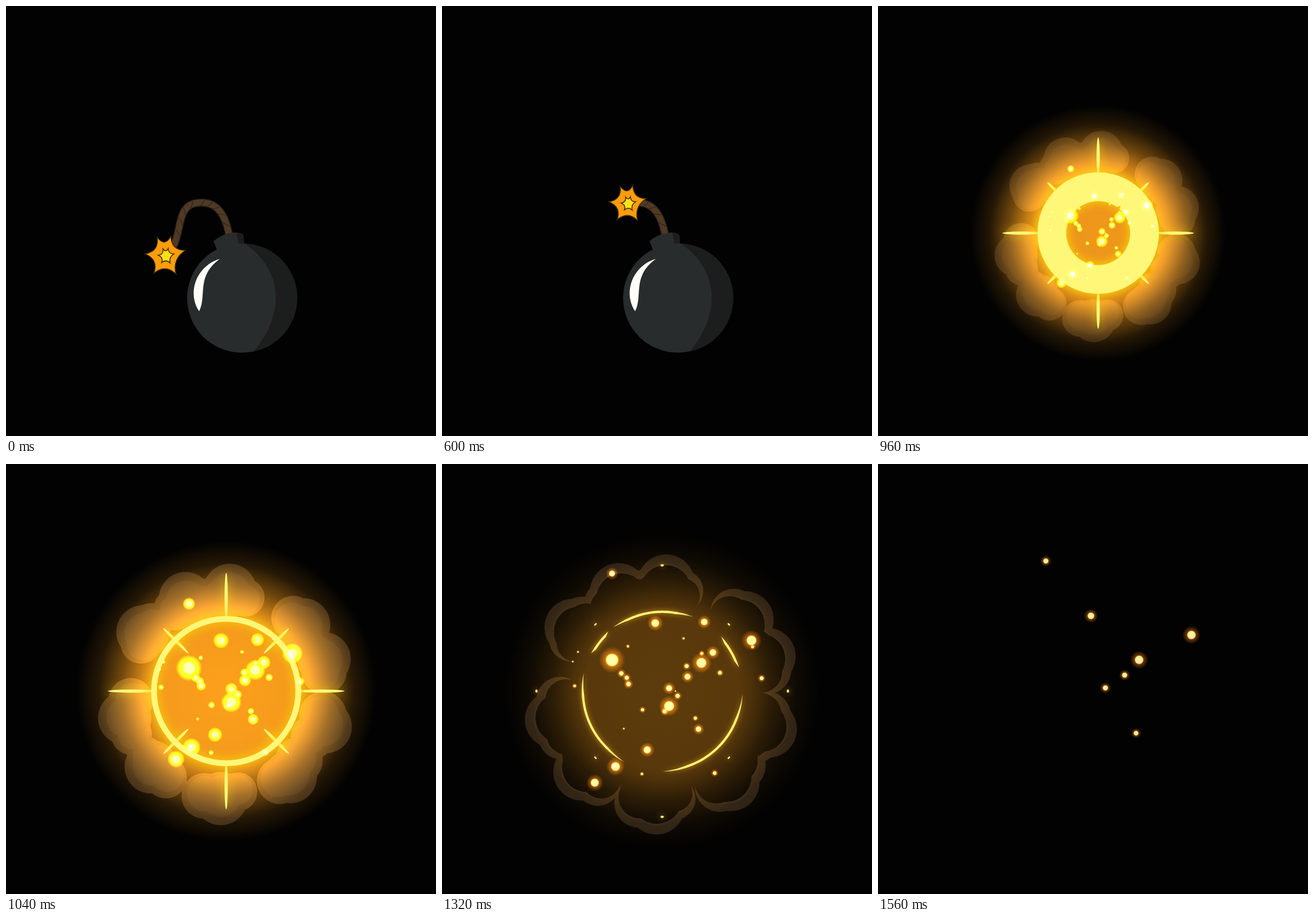
Recreate the animation shown at these times as an HTML page with a canvas. Size 748x748 px, loop 1.6 s.

```html
<!DOCTYPE html>
<html lang="en">
<head>
<meta charset="utf-8">
<title>Bomb</title>
<style>
html, body { margin: 0; width: 100%; height: 100%; overflow: hidden; background: #020202; }
canvas { display: block; }
</style>
</head>
<body>
<canvas id="stage" width="748" height="748"></canvas>
<script>
const SIZE = 748, LOOP = 1600, STEP = 40, CX = 383, CY = 395, RAD = Math.PI / 180;
const ctx = document.getElementById('stage').getContext('2d');
const smokeLayer = document.createElement('canvas');
smokeLayer.width = smokeLayer.height = SIZE;
const smokeCtx = smokeLayer.getContext('2d');

let seed = 11;
function random(min, max) {
  seed = seed * 16807 % 2147483647;
  return min + (max - min) * seed / 2147483647;
}

const polar = (degrees, r) => [r * Math.cos(degrees * RAD), r * Math.sin(degrees * RAD)];

// Every smoke lobe is one big puff with two smaller ones at its sides
const puffs = [-143, -113, -88, -42, -20, 18, 52, 93, 136, 167].flatMap(angle => [
  [...polar(angle, 180), 46],
  [...polar(angle - random(6, 10), random(165, 180)), random(32, 42)],
  [...polar(angle + random(6, 10), random(165, 180)), random(32, 42)]
]);

// The brightest embers [x, y, radius]; the first ones outlive the rest
const LASTING = 7;
const embers = [
  [538, 307, 9], [451, 346, 9], [427, 370, 5.5], [395, 390, 5.5], [371, 277, 7],
  [296, 191, 5.5], [446, 461, 5], [296, 341, 11.5], [395, 421, 9], [302, 526, 8],
  [266, 554, 7.5], [357, 497, 6.5], [471, 328, 6], [456, 275, 6]
];
for (let i = 0; i < 22; i++) {
  const [dx, dy] = polar(random(0, 360), random(20, 175));
  embers.push([CX + dx, CY + dy, random(1, 4.5)]);
}

// Centre angle and half span in degrees
const arcs = [[-97.5, 30], [-142, 10], [-30, 13], [46, 44], [155.5, 37.5]];
const sparkTips = [-114, -75, -16, 60, 124, 186].map(angle => polar(angle, 36));

// Piecewise linear value over time: key(t, time, value, time, value, ...)
function key(t, ...k) {
  if (t <= k[0]) return k[1];
  for (let i = 2; i < k.length; i += 2) {
    if (t <= k[i]) return k[i - 1] + (k[i + 1] - k[i - 1]) * (t - k[i - 2]) / (k[i] - k[i - 2]);
  }
  return k[k.length - 1];
}

// Rises from 0 at the start towards 1, slowing down
const easeOut = (t, start, tau) => 1 - Math.exp(-Math.max(0, t - start) / tau);
const burst = t => easeOut(t, 873, 62);

function disc(c, x, y, r) {
  c.beginPath();
  c.arc(x, y, r, 0, 7);
  c.fill();
}

function shape(d, fill) {
  ctx.fillStyle = fill;
  ctx.fill(new Path2D(d));
}

function stroke(color, width) {
  ctx.strokeStyle = color;
  ctx.lineWidth = width;
  ctx.stroke();
}

function radial(x, y, r, stops) {
  const g = ctx.createRadialGradient(x, y, 0, x, y, r);
  stops.forEach(([at, color]) => g.addColorStop(at, color));
  ctx.fillStyle = g;
  disc(ctx, x, y, r);
}

function cubic(u, a, b, c, d) {
  const v = 1 - u;
  return v * v * v * a + 3 * v * v * u * b + 3 * v * u * u * c + u * u * u * d;
}

// Fuse position: 0 at the bomb, 1 at the top of the bend, 2 at the free end
function fusePoint(s) {
  return s < 1
    ? [cubic(s, 388, 380, 362, 340), cubic(s, 398, 355, 342, 342)]
    : [cubic(s - 1, 340, 296, 308, 290), cubic(s - 1, 342, 342, 385, 420)];
}

function fuseSide(s, offset) {
  const [x, y] = fusePoint(s), [x2, y2] = fusePoint(s + .01);
  const len = Math.hypot(x2 - x, y2 - y);
  return [x - (y2 - y) / len * offset, y + (x2 - x) / len * offset];
}

function drawFuse(end) {
  ctx.beginPath();
  for (let s = 0; s < end; s += .02) ctx.lineTo(...fusePoint(s));
  stroke('#2b241e', 13.5);
  stroke('#513924', 10.5);
  ctx.beginPath();
  for (let s = .12; s < end - .1; s += .2) {
    ctx.moveTo(...fuseSide(s, 5));
    ctx.quadraticCurveTo(...fusePoint(s + .02), ...fuseSide(s + .1, -5));
  }
  stroke('#30231a', 1.3);
}

function drawStar(x, y, scale, fill) {
  ctx.beginPath();
  sparkTips.forEach(([px, py], i) => {
    const [qx, qy] = sparkTips[(i + 1) % 6];
    if (!i) ctx.moveTo(x + px * scale, y + py * scale);
    ctx.quadraticCurveTo(x + (px + qx) * .22 * scale, y + (py + qy) * .22 * scale,
      x + qx * scale, y + qy * scale);
  });
  ctx.closePath();
  ctx.fillStyle = fill;
  ctx.fill();
  stroke('#3b2c16', 1.5);
}

function drawBomb(t) {
  const burn = key(t, 0, 2.15, 320, 1.6, 600, 1.13, 880, .3, 960, 0);
  ctx.globalAlpha = key(t, 880, 1, 960, 0);
  drawFuse(Math.min(2, burn));
  shape('M400 394Q409 394 413 398L415 420H405Z', '#1c1e1d');
  ctx.fillStyle = '#282c2c';
  disc(ctx, 410, 508, 95);
  shape('M415 413C483 460 486 535 431 601A95 95 0 0 0 415 413Z', '#1c1e1d');
  shape('M361 409Q379 394 401 394L405 416L369 430Z', '#282c2c');
  shape('M372 440C335 450 313 495 336 531C350 505 330 470 372 440Z', '#fffff8');
  if (t < 920) {
    const [x, y] = fusePoint(burn);
    const scale = .875 + .125 * Math.cos(t / 213 * 2 * Math.PI);
    drawStar(x - 2, y, scale, '#ff9c0a');
    drawStar(x - 1, y, scale * .38, '#ffe012');
  }
  ctx.globalAlpha = 1;
}

function drawGlow(t) {
  const alpha = key(t, 840, 0, 880, .4, 960, .95, 1040, 1, 1320, .36, 1540, 0);
  const falloff = [[0, 1], [.49, .96], [.56, .84], [.7, .45], [.85, .14], [1, 0]];
  radial(CX, CY, 275 * burst(t) ** .75,
    falloff.map(([at, a]) => [at, `rgba(253,160,28,${a * alpha})`]));
}

// Puffs are hollowed out from the inside until only thin crescents remain
function drawSmoke(t) {
  const spread = 1.08 * burst(t), age = Math.max(0, (t - 1040) / 520);
  const each = (scale, shift) => puffs.forEach(([dx, dy, r]) => {
    const k = spread - shift * r / Math.hypot(dx, dy);
    disc(smokeCtx, CX + dx * k, CY + 6 + dy * k, r * scale * spread);
  });
  smokeCtx.globalCompositeOperation = 'source-over';
  smokeCtx.clearRect(0, 0, SIZE, SIZE);
  smokeCtx.fillStyle = '#b08658';
  each(1, 0);
  smokeCtx.fillStyle = '#d0a474';
  each(.78, .1);
  smokeCtx.globalCompositeOperation = 'destination-out';
  each(1.1 * age ** .35, .5 - .4 * age);
  ctx.globalCompositeOperation = 'lighter';
  ctx.globalAlpha = key(t, 880, 0, 1000, .24, 1320, .2, 1560, .07);
  ctx.drawImage(smokeLayer, 0, 0);
  ctx.globalAlpha = 1;
  ctx.globalCompositeOperation = 'source-over';
}

function drawRays(t) {
  if (t < 960 || t > 1340) return;
  const grow = burst(t);
  const inner = key(t, 1040, 138, 1320, 226) * grow, outer = 230 * grow;
  for (let i = 0; i < 8; i++) {
    const scale = i % 2 ? .72 : .96;
    ctx.save();
    ctx.translate(CX, CY);
    ctx.rotate(i * Math.PI / 4);
    ctx.beginPath();
    ctx.ellipse((inner + outer) / 2 * scale, 0, (outer - inner) / 2 * scale, 2.8, 0, 0, 7);
    ctx.fill();
    ctx.restore();
  }
}

// Tapered arcs that overlap into a full ring, then shrink apart
function drawRing(t) {
  const radius = 140 * burst(t);
  const width = Math.min(radius, key(t, 960, 50, 1040, 10, 1320, 4, 1420, 1));
  const span = key(t, 1040, 2.5, 1320, 1, 1420, 0);
  if (!span) return;
  ctx.beginPath();
  for (const [middle, half] of arcs) {
    for (let i = 0; i <= 120; i++) {
      const u = (i <= 60 ? i : 120 - i) / 60;
      const taper = i <= 60 ? 0 : width * Math.min(1, 1.6 * Math.sin(Math.PI * u));
      const [x, y] = polar(middle + half * span * (2 * u - 1), radius - taper);
      ctx[i ? 'lineTo' : 'moveTo'](CX + x, CY + y);
    }
    ctx.closePath();
  }
  ctx.fill();
}

function drawEmbers(t) {
  const spread = 1.06 * easeOut(t, 840, 165), size = key(t, 840, 0, 1040, 1);
  const fade = key(t, 1320, 0, 1560, 1);
  const halo = `255,${key(t, 880, 130, 1040, 230, 1320, 130)},10`;
  const strength = key(t, 1040, .8, 1320, .4);
  ctx.globalCompositeOperation = 'lighter';
  embers.forEach(([x, y, r], i) => {
    const radius = 2 * r * size * (1 - fade * (i < LASTING ? .12 : 1));
    radial(CX + (x - CX) * spread, CY + (y - CY) * spread * (1 + .06 * fade), radius, [
      [0, '#fff0a0'], [.4, '#ffe898'],
      [.52, `rgba(${halo},${strength})`], [1, `rgba(${halo},0)`]
    ]);
  });
  ctx.globalCompositeOperation = 'source-over';
}

function draw(t) {
  ctx.fillStyle = '#020202';
  ctx.fillRect(0, 0, SIZE, SIZE);
  if (t < 960) drawBomb(t);
  if (t > 840) {
    drawGlow(t);
    drawSmoke(t);
    ctx.save();
    ctx.fillStyle = '#fff778';
    ctx.shadowColor = t < 1200 ? '#ffdc00' : '#e89a10';
    ctx.shadowBlur = key(t, 1040, 18, 1320, 8);
    drawRays(t);
    drawRing(t);
    ctx.restore();
    drawEmbers(t);
  }
}

function frame(now) {
  let t = Math.floor(now % LOOP / STEP) * STEP;
  if (t === 1080 || t === 1160) t -= STEP; // two poses are held twice as long
  draw(t);
  requestAnimationFrame(frame);
}
requestAnimationFrame(frame);
</script>
</body>
</html>
```
